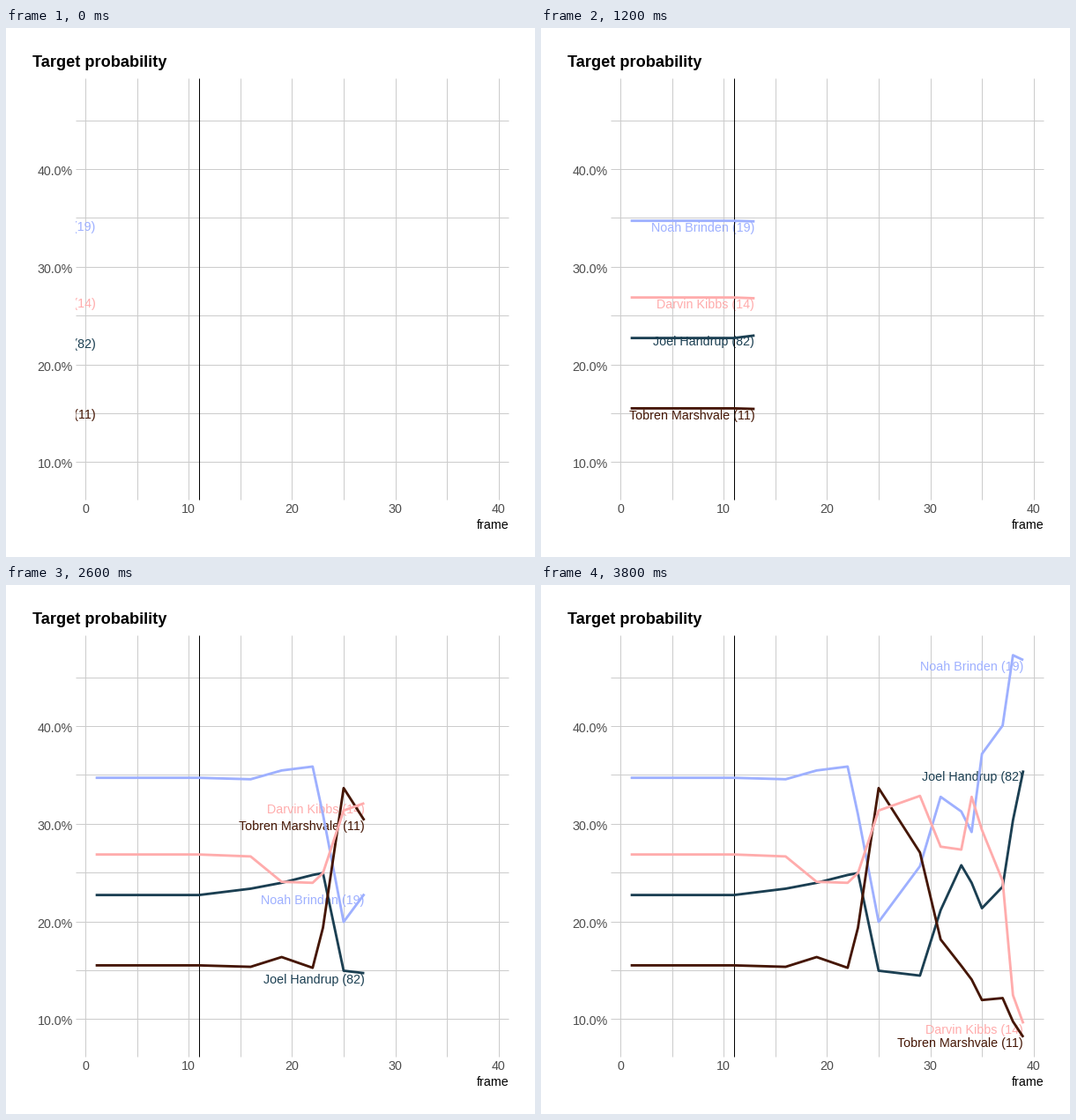
A matplotlib script that plays this animation: 600x600 px, repeating every 5.8 s.

```python
import matplotlib.pyplot as plt
import numpy as np
from matplotlib.animation import FuncAnimation
from matplotlib.patches import Rectangle

SIZE, DPI = 600, 100
PT = 72 / DPI  # points per pixel
LEFT, TOP, RIGHT, BOTTOM = 79, 57, 570, 535
THROW, LAST = 11, 39
FRAMES, STEP_MS = 58, 100

plt.rcParams["font.family"] = "Liberation Sans"

# Steps where the curves bend; each player has one percentage per bend.
BENDS = [THROW, 16, 19, 22, 23, 25, 29, 31, 33, 34, 35, 37, 38, LAST]
PLAYERS = [
    ("Noah Brinden (19)", "#9EB0FF",
     [34.75, 34.6, 35.5, 35.9, 31, 20, 25.7, 32.8, 31.3, 29.2, 37.2, 40.1,
      47.3, 46.8]),
    ("Joel Handrup (82)", "#1B3F52",
     [22.75, 23.4, 24, 24.8, 25, 15, 14.5, 21.2, 25.8, 24, 21.4, 23.6,
      30.4, 35.5]),
    ("Tobren Marshvale (11)", "#451604",
     [15.55, 15.4, 16.4, 15.3, 19.4, 33.7, 27.1, 18.2, 15.5, 14.1, 12, 12.2,
      9.8, 8.2]),
    ("Darvin Kibbs (14)", "#FFACAC",
     [26.9, 26.7, 24.1, 24, 25, 31.4, 32.9, 27.7, 27.4, 32.8, 29.4, 24.2,
      12.5, 9.6]),
]


def px(step):
    return 89.95 + 11.72 * step


def py(percent):
    return 160 + 11.08 * (40 - percent)


fig = plt.figure(figsize=(SIZE / DPI, SIZE / DPI), dpi=DPI, facecolor="white")
ax = fig.add_axes([0, 0, 1, 1])
ax.set(xlim=(0, SIZE), ylim=(SIZE, 0))
ax.axis("off")
panel = Rectangle((LEFT, TOP), RIGHT - LEFT, BOTTOM - TOP,
                  transform=ax.transData)


def write(x, y, text, size=14.2, **style):
    return ax.text(x, y, text, fontsize=size * PT, va="baseline", **style)


def rule(xs, ys, color, zorder):
    ax.plot(xs, ys, color=color, lw=PT, zorder=zorder, snap=True,
            solid_capstyle="butt")


for step in range(0, 41, 5):
    rule([px(step)] * 2, [TOP, BOTTOM], "#CCCCCC", 1)
    if step % 10 == 0:
        write(px(step), 550, str(step), ha="center", color="#4D4D4D")
for percent in range(10, 46, 5):
    rule([LEFT, RIGHT], [py(percent)] * 2, "#CCCCCC", 1)
    if percent % 10 == 0:
        write(76, py(percent) + 7, f"{percent:.1f}%", ha="right",
              color="#4D4D4D")
rule([px(THROW)] * 2, [TOP, BOTTOM], "black", 3)

write(30, 44, "Target probability", size=18.2, weight="bold", color="black")
write(RIGHT + 1, 568, "frame", ha="right", color="black")

steps = np.arange(1, LAST + 1)
xs = px(steps)
tracks = []
for name, color, levels in PLAYERS:
    ys = py(np.interp(steps, BENDS, levels)) + 0.5  # centre on the pixel row
    line, = ax.plot([], [], color=color, lw=2.85 * PT, zorder=4, snap=False,
                    solid_capstyle="butt", solid_joinstyle="round")
    label = write(0, 0, name, ha="right", color=color, zorder=2)
    for artist in (line, label):
        artist.set_clip_path(panel)
        artist.set_clip_on(True)
    tracks.append((line, label, ys))


def update(frame):
    count = min(frame + 1, LAST)
    for line, label, ys in tracks:
        line.set_data(xs[:count], ys[:count])
        label.set_position((xs[count - 1], ys[count - 1] + 11.5))
    return [artist for track in tracks for artist in track[:2]]


anim = FuncAnimation(fig, update, frames=FRAMES, interval=STEP_MS,
                     init_func=lambda: update(0), repeat=True, repeat_delay=0)
plt.show()
```
